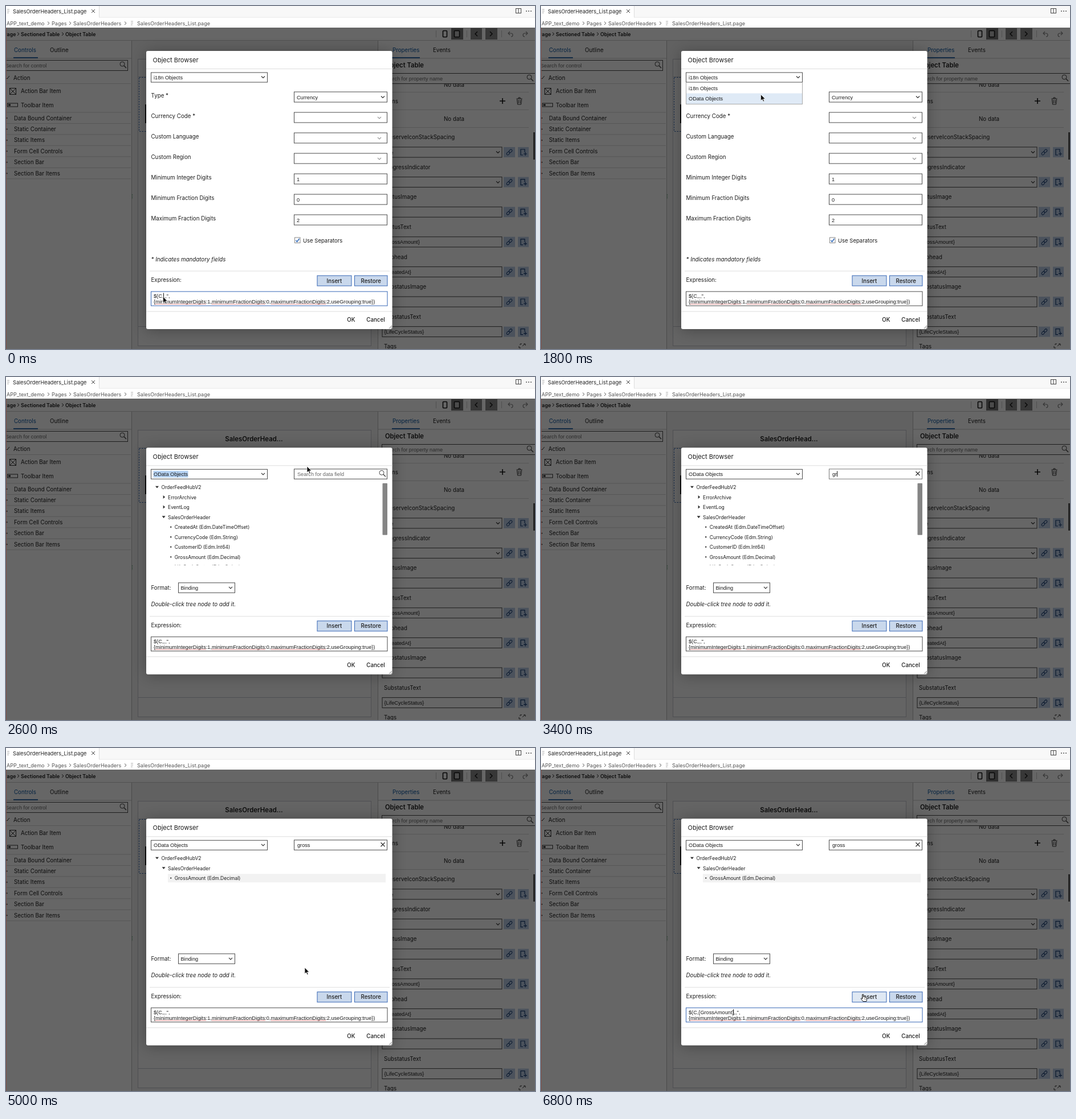
Animation of 928x603 px, one loop 7000 ms. Source, as an HTML page:

```html
<!DOCTYPE html>
<html lang="en">
<head>
<meta charset="utf-8">
<title>Object Browser</title>
<style>
html, body { margin: 0; width: 100%; height: 100%; overflow: hidden; background: #fff; }
svg { display: block; width: 928px; height: 603px; }
text { font-family: Inter, Roboto, sans-serif; font-size: 9.75px; fill: #1c1c1c; white-space: pre; }
.field { font-family: "Liberation Sans", sans-serif; font-size: 9.19px; }
.tree { font-size: 8.5px; }
.crumb { font-size: 9.1px; fill: #555; }
.bold { font-weight: 600; }
.btn { font-weight: 500; }
.it { font-style: italic; }
.hint { fill: #666; }
</style>
</head>
<body>
<svg id="stage" viewBox="0 0 928 603" xmlns="http://www.w3.org/2000/svg"></svg>
<script>
const STEP = 200, LOOP = 7000, INK = '#333', BLUE = '#3767b5';

// Markup helpers; text y is the visual middle of the line.
const text = (x, y, s, cls = '', extra = '') =>
  `<text x="${x}" y="${y + 3.5}" class="${cls}" ${extra}>${s}</text>`;
const rect = (x, y, w, h, fill = 'none', stroke = 'none', extra = '') =>
  `<rect x="${x}" y="${y}" width="${w}" height="${h}" fill="${fill}" stroke="${stroke}" ${extra}/>`;
const path = (d, stroke = INK, w = 1, extra = '') =>
  `<path d="${d}" fill="none" stroke="${stroke}" stroke-width="${w}" ${extra}/>`;
const shape = (d, fill = INK) => `<path d="${d}" fill="${fill}"/>`;
const hline = (x1, x2, y, c = '#d9d9d9') => path(`M${x1} ${y}H${x2}`, c);
const group = (id, s, extra = '') => `<g id="${id}" ${extra}>${s}</g>`;
const box = (x, y, w, h = 18, extra = '') => rect(x, y, w, h, '#fff', '#4a4a4a', extra);
const chevron = (x, y, c = INK, r = 3) => path(`M${x - r} ${y - r / 2}l${r} ${r}l${r} ${-r}`, c, 1.2);
const lens = (x, y, c = '#444') =>
  `<circle cx="${x - 1}" cy="${y - 1}" r="4" fill="none" stroke="${c}"/>` + path(`M${x + 2} ${y + 2}l4 4`, c, 1.5);
const button = (x, y, w, s, id = '') =>
  rect(x, y, w, 18, '#c9d8ec', BLUE, id && `id="${id}"`) +
  text(x + w / 2, y + 9, s, 'btn', 'text-anchor="middle"');

function editorTop() {
  const sep = x => path(`M${x} 27.5l3 2.8l-3 2.8`, '#555');
  return rect(0, 0, 928, 38, '#fff') + rect(163, 0, 765, 20, '#f8f8f8') +
    hline(163, 928, 20, '#e7e7e7') + path('M163.5 0V20', '#ddd') +
    path('M2 6h4M2 9h4M2 12h3', '#aaa') + path('M150 6l6 6m0-6l-6 6', '#444') +
    text(12, 9.5, 'SalesOrderHeaders_List.page', 'crumb', 'style="fill:#222;font-size:9.2px"') +
    rect(894.5, 4.5, 9, 8, 'none', '#444') + path('M899 4.5v8', '#444') +
    [913, 917, 921].map(x => `<circle cx="${x}" cy="9" r=".9" fill="#444"/>`).join('') +
    text(1, 30, 'APP_text_demo', 'crumb') + sep(73) + text(80, 30, 'Pages', 'crumb') + sep(111) +
    text(118, 30, 'SalesOrderHeaders', 'crumb') + sep(208) +
    path('M219 27h4M219 30h4M219 33h3', '#aaa') + text(230, 30, 'SalesOrderHeaders_List.page', 'crumb');
}

function toolbar() {
  const small = 'style="font-size:8.8px"';
  const sep = x => path(`M${x} 46.5l3 2.7l-3 2.7`, '#222');
  return text(-4, 49, 'Page', 'bold', small) + sep(20) + text(26, 49, 'Sectioned Table', 'bold', small) +
    sep(98) + text(104, 49, 'Object Table', 'bold', small) + hline(0, 928, 60.5, '#ccc') +
    path('M754.5 43v12M808.5 43v12M869.5 43v12', '#ccc') +
    rect(766.5, 43.5, 7, 11, '#fff', '#111', 'stroke-width="1.6" rx="1"') +
    rect(781, 39, 21, 20, '#777') + rect(786.5, 43.5, 9, 11, '#bbb', '#111', 'stroke-width="1.5" rx="1"') +
    rect(815, 39, 20, 20, '#8a8a8a') + rect(841, 39, 21, 20, '#8a8a8a') +
    path('M827 45l-4 4l4 4M849 45l4 4l-4 4', '#111', 1.4) +
    path('M884 45l-3 3l3 3M881 48h5q3 0 3 3t-3 3M912 45l3 3l-3 3M915 48h-5q-3 0-3 3t3 3', '#888', 1.2);
}

function leftPanel() {
  const names = ['Data Bound Container', 'Static Container', 'Static Items', 'Form Cell Controls', 'Section Bar', 'Section Bar Items'];
  return text(14, 77, 'Controls', '', 'style="fill:#0854a0"') + text(77, 77, 'Outline') +
    rect(13, 90, 43, 2.2, '#0854a0') + hline(0, 220, 92, '#ccc') +
    box(-2, 95.5, 215.5) + text(-1, 104, 'Search for control', 'field hint') + lens(205, 103) +
    path('M0 126l2 2l4-5') + text(13, 126, 'Action') + hline(0, 219, 136.5) +
    rect(6.5, 144.5, 11, 11, 'none', INK) + path('M7 145l10 10m0-10l-10 10') + text(26, 149.5, 'Action Bar Item') +
    rect(2.5, 171, 18, 6, 'none', INK) + rect(4, 172.5, 4, 3, INK) + text(26, 174, 'Toolbar Item') + hline(0, 219, 187) +
    names.map((s, i) => {
      const y = 197 + i * 19.45;
      return shape(`M0 ${y - 2}l3 2l-3 2z`) + text(14, y, s) + hline(0, 219, y + 9.5);
    }).join('') + path('M220.5 61V603', '#bbb') + path('M221.5 331v8', '#58a070', 1.5, 'stroke-dasharray="1 1.5"');
}

function canvasArea() {
  return rect(221, 61, 431, 542, '#f4f4f4') + rect(231.5, 93.5, 409, 504, '#fafafa', '#c3c7cf') +
    text(435, 109.5, 'SalesOrderHead...', 'bold', 'text-anchor="middle" style="font-size:11.4px"') +
    hline(232, 640, 124.5) + hline(232, 640, 563.5, '#c3c7cf') +
    rect(233.5, 125.5, 404, 95, 'none', '#2c62b0', 'stroke-dasharray="2.5 2"') + rect(244, 173, 3, 33, '#222');
}

function rightPanel() {
  const rows = [['PreserveIconStackSpacing', 'true', 1], ['ProgressIndicator', '', 1], ['StatusImage', ''],
    ['StatusText', '{GrossAmount}'], ['Subhead', '{CreatedAt}'], ['SubstatusImage', ''], ['SubstatusText', '{LifeCycleStatus}']];
  const links = y => rect(873, y - 9, 20, 18, '#bccfe8') + rect(898, y - 9, 19, 18, '#bccfe8') +
    `<g transform="translate(883 ${y}) rotate(-45)">` +
    rect(-6, -2, 6, 4, 'none', '#173b70', 'rx="2"') + rect(0, -2, 6, 4, 'none', '#173b70', 'rx="2"') + '</g>' +
    path(`M907 ${y + 5}h-4v-10h7v5M908 ${y + 3}h6m-3-3v6`, '#173b70', 1.2);
  return path('M652.5 61V603', '#bbb') + text(678, 77, 'Properties', '', 'style="fill:#0854a0"') + text(749, 77, 'Events') +
    rect(677, 90, 49, 2.2, '#0854a0') + hline(653, 928, 92, '#ccc') +
    text(665, 104.5, 'Object Table', 'bold', 'style="font-size:11.2px"') +
    text(768, 138, 'No data') + rect(653, 117, 275, 20, '#fff') +
    box(659.5, 118.5, 270) + text(662, 127.5, 'Search for property name', 'field hint') + lens(919, 126) +
    hline(659, 917, 151.5) + text(663, 167, 'Icons') + path('M866 167h10m-5-5v10', '#111', 1.6) +
    path('M895.5 163h10M899 163v-2h3v2M896.5 164l1 9h6l1-9M899 165v6m3-6v6', INK) +
    hline(659, 917, 182.5) + text(768, 198, 'No data') + hline(659, 917, 213.5) +
    rows.map(([name, value, pick], i) => {
      const y = 257 + i * 52.6;
      return text(663, y - 26.3, name) + box(660, y - 9, 210) + text(663.5, y, value, 'field') +
        (pick ? chevron(863, y) : '') + links(y);
    }).join('') + text(663, 598.5, 'Tags') + path('M902 596v-2h3M908 594h3v3M903 601h-3v-3M906 598l4-4', INK) +
    rect(925, 222, 3, 48, '#555');
}

function formBody() {
  const rows = ['Type *', 'Currency Code *', 'Custom Language', 'Custom Region',
    'Minimum Integer Digits', 'Minimum Fraction Digits', 'Maximum Fraction Digits'];
  const values = ['Currency', '', '', '', '1', '0', '2'];
  return rows.map((s, i) => {
    const y = 160 + i * 36;
    return text(254.5, y - 3, s) + box(505.5, y - 9, 163) + text(510, y, values[i], 'field') +
      (i ? i < 4 ? chevron(655, y + .5, '#999') : '' : chevron(661, y));
  }).join('') + rect(506.5, 407, 9.5, 9.5, '#fff', '#888') + path('M508.5 412l2 2.5l4-5.5', '#2e68b8', 1.5) +
    text(521, 412, 'Use Separators', '', 'style="font-size:9.5px"') + text(254.5, 445, '* Indicates mandatory fields', 'it');
}

// Tree rows: [level, marker, label]; marker is open, shut or leaf.
function tree(rows) {
  return rows.map(([level, mark, s], i) => {
    const x = 272.5 + level * 11.6, y = 148.2 + i * 17.55;
    const glyph = { open: shape(`M${x - 10.5} ${y - 1.8}h6l-3 3.8z`), shut: shape(`M${x - 8.5} ${y - 3}v6l3.5-3z`),
      leaf: `<circle cx="${x - 6.5}" cy="${y}" r="1.2" fill="${INK}"/>` }[mark];
    return glyph + text(x, y, s, 'tree');
  }).join('');
}

const leaf = (level, s) => [level, 'leaf', s];
const root = [0, 'open', 'OrderFeedHubV2'], gross = leaf(2, 'GrossAmount (Edm.Decimal)');
const labels = tree([['main', 'Main'], ['customers', 'Customers'], ['salesOrderHeaders', 'SalesOrderHeaders']]
  .map(([k, v]) => leaf(0, `${k}_title: "${v}"`))
  .concat(['support', 'about'].map(k => leaf(0, `${k}_popovermenuitem: "${k[0].toUpperCase() + k.slice(1)}"`))));
const fullTree = tree([root, [1, 'shut', 'ErrorArchive'], [1, 'shut', 'EventLog'], [1, 'open', 'SalesOrderHeader'],
  leaf(2, 'CreatedAt (Edm.DateTimeOffset)'), leaf(2, 'CurrencyCode (Edm.String)'), leaf(2, 'CustomerID (Edm.Int64)'),
  gross, leaf(2, 'LifeCycleStatus (Edm.String)')]);
const foundTree = tree([root, [1, 'open', 'SalesOrderHeader'], gross]);

function browseBody() {
  return box(505.5, 116.5, 163, 17.5, 'id="searchBox"') + text(511, 125.3, '', 'field', 'id="query"') +
    path('M0 120v10', '#111', 1, 'id="queryCaret"') + group('lens', lens(660, 124)) +
    group('clear', path('M657.5 121l7 7m0-7l-7 7', '#333', 1.3)) + group('labels', labels) +
    group('full', `<g clip-path="url(#treeClip)">${fullTree}</g>` + rect(660.5, 141.5, 8.5, 91, '#858585', 'none', 'rx="1"')) +
    group('found', rect(284, 176, 382, 15, '#f2f2f2', 'none', 'id="rowFill"') + foundTree) +
    text(254.5, 325.3, 'Format:') + box(302.5, 316.5, 99, 17.5) + text(306.5, 325.2, 'Binding', 'field') + chevron(394, 325) +
    text(254.5, 354.5, 'Double-click tree node to add it.', 'it');
}

// Footer is laid out upward from the dialog's bottom edge at y = 0.
function footer() {
  const wavy = [[262, 351], [361, 455], [465, 561]].map(([a, b]) => path(`M${a} -43.8H${b}`, '#e04848', 1, 'stroke-dasharray="1.3 .9"')).join('');
  return hline(252, 673, -102, '#ddd') + text(254.5, -86.3, 'Expression:') +
    button(546, -94, 60, 'Insert', 'insert') + button(611.5, -94, 57.5, 'Restore') +
    box(254.5, -66, 414.5, 25, 'id="area"') + text(259, -58.3, '', 'field', 'id="expr"') +
    text(259, -48.7, '{minimumIntegerDigits:1,minimumFractionDigits:0,maximumFractionDigits:2,useGrouping:true})', 'field') +
    wavy + path('M0 -63.5v10.5', '#111', 1, 'id="exprCaret"') + hline(246.5, 677, -31, '#ddd') +
    text(605.3, -16.3, 'OK', 'btn', 'id="ok" text-anchor="middle"') + text(648.5, -16.3, 'Cancel', 'btn', 'text-anchor="middle"') +
    path('M672 -1l5-5M675 -1l2-2', '#777');
}

function dialog() {
  return rect(246, 79, 431.5, 489, '#fff', 'none', 'id="panel" rx="3" filter="url(#shadow)"') +
    text(257.5, 95, 'Object Browser', '', 'style="font-size:11px"') + hline(246, 677.5, 110.5, '#ddd') +
    box(254.5, 117, 204, 17) + rect(258.5, 119.5, 61, 12, '#b5d2f3', 'none', 'id="mark"') +
    text(259, 125.5, '', 'field', 'id="kind"') +
    rect(444, 117.5, 14.5, 16, '#d5e3f2', 'none', 'id="arrowHover"') + chevron(451, 125) +
    group('form', formBody()) + group('browse', browseBody()) + group('foot', footer()) +
    group('menu', rect(254.5, 134.5, 204, 38, '#fff', '#aaa') + rect(255, 153.5, 203, 18.5, '#dfeaf6') +
      text(259, 144, 'i18n Objects', 'field') + text(259, 162.5, 'OData Objects', 'field'));
}

const stage = document.getElementById('stage');
stage.innerHTML = `<defs><clipPath id="treeClip"><rect x="250" y="140" width="410" height="145.5"/></clipPath>
  <filter id="shadow" x="-20%" y="-20%" width="140%" height="140%"><feDropShadow dx="0" dy="2" stdDeviation="13" flood-color="#000" flood-opacity=".3"/></filter></defs>` +
  rect(0, 38, 928, 565, '#fff') + canvasArea() + toolbar() + leftPanel() + rightPanel() +
  rect(0, 38, 928, 565, '#000', 'none', 'opacity=".6"') + rect(0, 38, 1, 565, '#7c4d45') + editorTop() +
  group('dialog', dialog()) +
  group('arrow', '<path d="M0 0v11l2.6-2.4l1.8 4l1.8-.8l-1.8-3.9h3.5z" fill="#111" stroke="#fff" stroke-width=".7"/>') +
  group('hand', '<path d="M-1 0q1-1 2 0v4l4 1q2 .6 1.7 2.6l-.8 4.4h-6l-3.4-4.5q-.6-1.2 1-1l1.5 1z" fill="#fff" stroke="#222" stroke-width="1"/>' +
    path('M2.5 6.5v2M4.5 7v2', '#222', .7));

const el = {};
stage.querySelectorAll('[id]').forEach(n => el[n.id] = n);
const show = (id, on) => el[id].setAttribute('visibility', on ? 'inherit' : 'hidden');
const set = (id, key, v) => el[id].setAttribute(key, v);
const label = (id, s) => { if (el[id].textContent !== s) el[id].textContent = s; };

// Pointer stops: time, x, y.
const stops = [[0, 275.5, 511], [200, 275.5, 511], [1100, 446, 125], [1400, 446, 125], [1800, 385.5, 155.5], [2400, 385.5, 155.5],
  [2600, 528, 157], [2800, 548, 168], [4000, 548, 168], [4400, 420, 226], [4700, 420, 226], [5000, 524, 386], [5400, 565, 433.5], [LOOP, 565, 433.5]];
function pointer(t) {
  const i = stops.findIndex(s => s[0] > t);
  const [t0, x0, y0] = stops[i - 1], [t1, x1, y1] = stops[i];
  const k = (t - t0) / (t1 - t0), e = k * k * (3 - 2 * k);
  return [x0 + (x1 - x0) * e, y0 + (y1 - y0) * e];
}

function draw(t) {
  const within = (a, b) => t >= a && t < b;
  const browsing = t >= 2000, loaded = t >= 2200, inserted = t >= 5800;
  const bottom = browsing ? 477.5 : 568;
  set('dialog', 'transform', `translate(0 ${loaded ? 45.3 : 0})`);
  set('panel', 'height', bottom - 79);
  set('foot', 'transform', `translate(0 ${bottom})`);
  show('form', !browsing);
  show('browse', browsing);
  show('menu', within(1400, 2000));
  show('mark', within(2000, 3000));
  show('arrowHover', within(1200, 1600));
  label('kind', browsing ? 'OData Objects' : 'i18n Objects');
  el.ok.style.fill = browsing && !loaded ? '#aaa' : '#1c1c1c';

  const typed = 'gross'.slice(0, Math.max(0, Math.floor((t - 3000) / 200)));
  const filtered = t >= 4200, searching = within(3000, 4600);
  label('query', typed || 'Search for data field');
  el.query.style.fill = typed ? '#1c1c1c' : '#666';
  set('searchBox', 'stroke', searching ? '#777' : '#4a4a4a');
  show('queryCaret', browsing && searching);
  if (searching) set('queryCaret', 'transform', `translate(${511.5 + (typed && el.query.getComputedTextLength())} 0)`);
  show('lens', browsing && !typed);
  show('clear', browsing && typed);
  show('labels', browsing && !loaded);
  show('full', loaded && !filtered);
  show('found', filtered);
  show('rowFill', t >= 4400);

  const focused = t < 1200 || inserted;
  label('expr', inserted ? "$(C,{GrossAmount},,''," : "$(C,,,'',");
  set('area', 'stroke', focused ? BLUE : '#4a4a4a');
  show('exprCaret', inserted ? !within(6200, 6600) : within(0, 400) || within(800, 1200));
  set('exprCaret', 'transform', `translate(${inserted ? 337.7 : 276.5} 0)`);
  set('insert', 'fill', t >= 5400 ? '#dfe8f3' : '#c9d8ec');

  const [x, y] = pointer(t), hand = within(1200, 1600) || t >= 5400;
  ['arrow', 'hand'].forEach(id => set(id, 'transform', `translate(${x} ${y})`));
  show('hand', hand);
  show('arrow', !hand && !within(3200, 4000));
}

const start = performance.now();
function tick() {
  const t = (performance.now() - start) % LOOP;
  draw(Math.floor(t / STEP) * STEP);
  requestAnimationFrame(tick);
}
tick();
</script>
</body>
</html>
```
